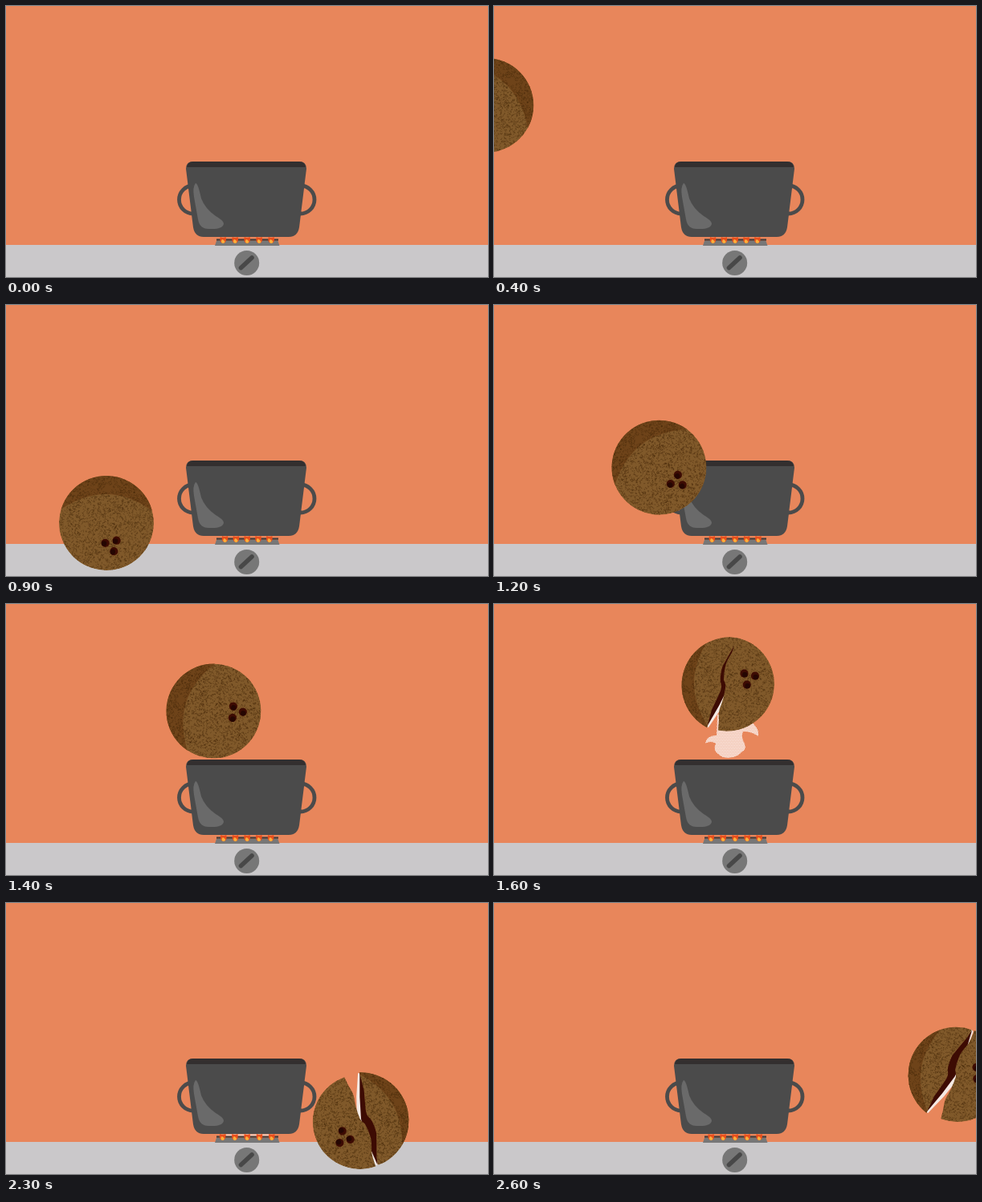
Animation of 600 by 338 pixels, one loop 2.7 s. Source, as an HTML page with a canvas:

```html
<!DOCTYPE html>
<html lang="en">
<head>
<meta charset="utf-8">
<title>Coconut and pot</title>
<style>
  html, body { margin: 0; width: 100%; height: 100%; overflow: hidden; background: #e8865b; }
  canvas { display: block; width: 600px; height: 338px; }
</style>
</head>
<body>
<canvas id="stage" width="600" height="338"></canvas>
<script>
const ctx = document.getElementById('stage').getContext('2d');
const LOOP = 2700, STEP = 100, R = 59, TAU = Math.PI * 2;

// Linear interpolation through [time, value] keys
function track(keys, t) {
  if (t <= keys[0][0]) return keys[0][1];
  for (let i = 1; i < keys.length; i++) {
    const [t0, v0] = keys[i - 1], [t1, v1] = keys[i];
    if (t <= t1) return v0 + (v1 - v0) * (t - t0) / (t1 - t0);
  }
  return keys[keys.length - 1][1];
}

const motion = {
  x: [[200, -64], [600, 44.5], [1200, 205.5], [1500, 285], [2000, 285], [2300, 450], [2600, 567.5]],
  y: [[200, 44], [300, 85], [600, 201.7], [700, 233], [800, 258], [900, 272], [1000, 260],
      [1100, 235], [1200, 202.7], [1500, 99], [2000, 99], [2100, 153], [2200, 216],
      [2300, 269], [2400, 275], [2500, 248], [2600, 211]],
  turn: [[200, 148], [600, 121.5], [900, 91], [1200, 52.5], [1500, 0], [2000, 0], [2300, -210], [2600, -350]],
  gap: [[1400, 0], [1500, 1], [1600, 5], [1800, 9], [2000, 10]],
  milk: [[1500, -40], [1600, 0], [1700, 48], [1800, 112]],
  spread: [[0, 15], [600, 13.25], [1200, 14.4], [1600, 15], [2000, 15.5], [2300, 15.3], [2700, 14.9]]
};

function seeded(seed) {
  return () => (seed = (seed * 16807) % 2147483647) / 2147483647;
}

function fill(path, color) {
  ctx.fillStyle = color;
  ctx.fill(path);
}

function stroke(path, color, width) {
  ctx.strokeStyle = color;
  ctx.lineWidth = width;
  ctx.stroke(path);
}

function disc(x, y, r, color) {
  ctx.fillStyle = color;
  ctx.beginPath();
  ctx.arc(x, y, r, 0, TAU);
  ctx.fill();
}

// Coconut shapes, centred on the origin
const whole = new Path2D();
whole.arc(0, 0, R, 0, TAU);

const leftHalf = new Path2D(
  'M18-57A60 60 0 0 0-20 55L-14 33L-6 16Q-1 6-2 2Q-4-5-3-9Q-2-20 1-24L6-33L14-47Z');
const rightHalf = new Path2D(
  'M11-58Q9-46 6-39Q-1-28-2-22Q-4-14-4-5Q-1 1-2 5Q-4 18-8 28Q-11 34-10 45L-11 58A59 59 0 1 0 11-58Z');
const flesh = new Path2D('M17-57L20-55L14-20L9 4L9 11L-2 31L-18 55L-20 54Z');
const husk = new Path2D('M18-56L14-20L7 4L-5 28L-20 54L-21 46L-14 30L-7 14L-4-8L0-27L13-48Z');
const shade = new Path2D('M-14-60Q-58 0-14 60L-70 60V-60Z');

const speckles = new Path2D();
const rnd = seeded(4127);
for (let i = 0; i < 2100; i++) {
  const a = rnd() * TAU, d = Math.sqrt(rnd()) * R, b = rnd() * TAU;
  const x = Math.cos(a) * d, y = Math.sin(a) * d;
  speckles.moveTo(x, y);
  speckles.lineTo(x + Math.cos(b) * 2, y + Math.sin(b) * 2);
}

function shell(shape) {
  ctx.save();
  ctx.clip(shape);
  fill(whole, '#80592a');
  fill(shade, '#6e4319');
  stroke(speckles, 'rgba(66,38,8,.5)', .8);
  ctx.restore();
}

function holes() {
  for (const [x, y] of [[21.5, -13], [35, -10], [24.8, 1]]) {
    disc(x, y, 5.1, '#3d0b03');
    disc(x + .8, y + 1.5, 3.2, '#250602');
  }
}

function coconut(t) {
  const x = track(motion.x, t), y = track(motion.y, t), gap = track(motion.gap, t);
  if (x < -R) return;
  ctx.save();
  ctx.translate(x, y);
  ctx.rotate(track(motion.turn, t) * Math.PI / 180);
  if (gap) {
    fill(flesh, '#f4e9e3');
    fill(husk, '#3d0b03');
    shell(leftHalf);
    ctx.translate(gap, gap / 8);
    shell(rightHalf);
  } else {
    shell(whole);
  }
  holes();
  ctx.restore();
}

const splash = new Path2D(
  'M278 138L277 164Q265 163 263 174Q270 170 276 174Q272 183 279 187Q283 192 292 192' +
  'Q303 191 308 185Q315 182 312 174Q307 166 310 159Q321 159 329 165Q330 157 325 152L316 138Z');
const drops = new Path2D();
for (let row = 0; row < 28; row++) {
  for (let col = 0; col < 34; col++) {
    drops.rect(262 + col * 2 + row % 2, 138 + row * 2, 1, 1);
  }
}

function milk(t) {
  if (t < 1500 || t > 1800) return;
  ctx.save();
  ctx.translate(0, track(motion.milk, t));
  ctx.clip(splash);
  fill(splash, '#f3cbbb');
  fill(drops, '#fdeee8');
  ctx.restore();
}

const body = new Path2D(
  'M224 203Q224 194 233 194H365Q374 194 374 203L365 276Q363 288 352 288H246Q235 288 233 276Z');
const rim = new Path2D('M225 201Q226 194 233 194H365Q372 194 373 201Z');
const shine = new Path2D(
  'M236 221Q232 226 234 238L239 266Q241 278 252 278Q271 279 271 271Q270 267 261 262Q248 253 243 240Q239 221 236 221Z');
const handles = new Path2D();
for (const x of [233, 366.5]) {
  handles.moveTo(x + 17.5, 241.5);
  handles.arc(x, 241.5, 17.5, 0, TAU);
}

function pot() {
  stroke(handles, '#4b4b4b', 4.8);
  fill(body, '#4b4b4b');
  fill(rim, '#332f2f');
  fill(shine, '#6a6a6a');
}

const burner = new Path2D('M262 293H338.500L340.500 299H260Z');
const flame = new Path2D('M-3.500-4Q0-2 3.500-4Q5 3 0 4Q-5 3-3.500-4Z');
const glow = new Path2D('M-1-1Q3 1 2 3Q0 5-2 3Q-3 1-1-1Z');

function stove(t) {
  ctx.fillStyle = '#cac8ca';
  ctx.fillRect(0, 298, 600, 40);
  fill(burner, '#777');
  ctx.fillStyle = '#3f3d3d';
  ctx.fillRect(262, 290.5, 77, 2.2);
  const spread = track(motion.spread, t);
  if (spread > 15.2) {
    ctx.fillStyle = spread > 15.4 ? '#f7f0ec' : '#efcfc2';
    ctx.fillRect(274, 288.5, 54, 1.8);
  }
  for (let i = -2; i <= 2; i++) {
    ctx.save();
    ctx.translate(300.2 + i * spread, 292);
    fill(flame, '#e94f1d');
    fill(glow, '#fbb03b');
    ctx.restore();
  }
  disc(299.7, 320.5, 15.5, '#777');
  ctx.lineCap = 'round';
  stroke(new Path2D('M292.500 326.500L306 314'), '#484848', 5.6);
  ctx.lineCap = 'butt';
}

function draw(t) {
  ctx.fillStyle = '#e8865b';
  ctx.fillRect(0, 0, 600, 338);
  milk(t);
  stove(t);
  pot();
  coconut(t);
}

const start = performance.now();
let shown = -1;
function tick() {
  const t = Math.floor(((performance.now() - start) % LOOP) / STEP) * STEP;
  if (t !== shown) draw(shown = t);
  requestAnimationFrame(tick);
}
tick();
</script>
</body>
</html>
```
